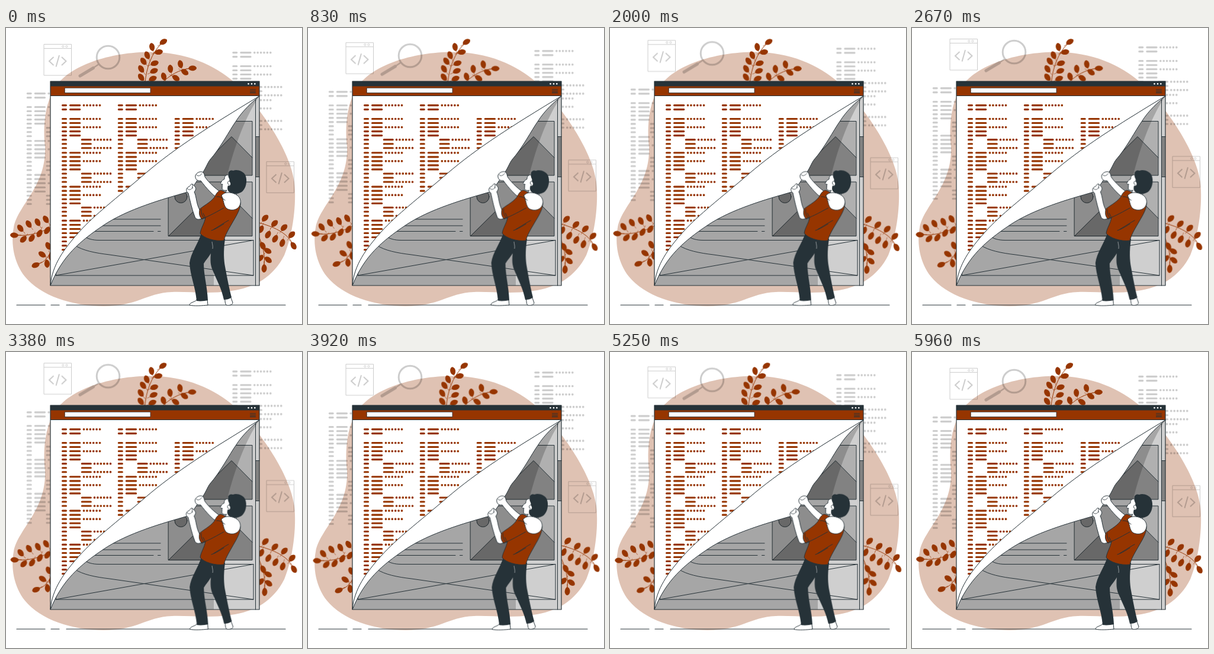
These frames come from a looping animation (500 by 500 pixels, 6000 ms). An HTML page:

```html
<!DOCTYPE html>
<html lang="en">
<head>
<meta charset="utf-8">
<title>Page peel</title>
<style>
  html, body { margin: 0; width: 100%; height: 100%; overflow: hidden; background: #fff; }
  svg { display: block; width: 100%; height: 100%; }
  .ink { fill: none; stroke: #263238; stroke-linecap: round; stroke-linejoin: round; }
  .skin { fill: #fff; stroke: #263238; stroke-linejoin: round; stroke-linecap: round; }
  .cloth { fill: #963500; stroke: #263238; stroke-linejoin: round; }
  .dark { fill: #263238; }
  .bars, .dots { fill: none; stroke-linecap: round; stroke-width: 3.1; }
  .dots { stroke-width: 3.7; }
  .float { animation: float 6s linear infinite; }
  .sway { transform-box: view-box; animation: sway 6s linear infinite; }
  #plants { transform-origin: 249px 215px; }
  #person { transform-origin: 358px 354px; }
  @keyframes float { 50% { transform: translateY(-10px); } }
  @keyframes sway {
    0%, 100% { transform: rotate(0deg); }
    25% { transform: rotate(1deg); }
    75% { transform: rotate(-1deg); }
  }
</style>
</head>
<body>
<svg viewBox="0 0 500 500" xmlns="http://www.w3.org/2000/svg">
  <defs>
    <path id="leaf" d="M-11 0L-6 0C-5 -4 0 -5.4 4 -4C7 -2.8 8 -.8 8 .5C7 3.6 3 5 0 4.2C-3 3.5 -5 2 -6 .4L-11 .6Z"/>
    <g id="snippet" fill="none" stroke="#000">
      <path d="M0 0H46.5V52.5H0ZM0 7H46.5" stroke-width="1"/>
      <circle cx="32.3" cy="3.6" r="1.6" stroke-width=".9"/>
      <circle cx="38.4" cy="3.6" r="1.6" stroke-width=".9"/>
      <path d="M16.5 21.5L9 28.5L16.5 35.500M30 21.500L37.500 28.500L30 35.500M26 18.500L20.500 38" stroke-width="2"/>
    </g>
    <g id="picture">
      <path d="M274.500 157.500H416V249H274.500Z" fill="#b0b0b0" class="edge"/>
      <circle cx="295.500" cy="182.500" r="10.500" fill="#828282"/>
      <path d="M274.500 249L319 205L341 223L381 183.500L416 219V249Z" fill="#828282"/>
      <circle class="ink" cx="295.500" cy="182.500" r="10.500"/>
      <path class="ink" d="M274.500 249L319 205L341 223L381 183.500L416 219M274.500 157.500H416V249H274.500Z"/>
    </g>
    <clipPath id="sheet">
      <path d="M75 115H428C345 165 285 203 235 246S150 315 124 344S78 400 75 435Z"/>
    </clipPath>
  </defs>

  <path fill="#dfc2b3" d="M66 201C62 165 66 128 82 102C103 67 166 42 240 40.500C303 40 352 62 386 92C430 134 480 207 487 260C491 296 485 348 470 384C452 420 420 439 380 444C340 450 312 445 280 446C236 448 222 470 165 470C112 470 58 452 32 420C13 396 8 364 13 337C20 299 68 268 66 201Z"/>

  <g class="float">
    <g id="faint" opacity=".2" stroke="#000">
      <use href="#snippet" x="64" y="27.500"/>
      <use href="#snippet" x="440" y="225.800"/>
      <g fill="none">
        <circle cx="172.500" cy="49.500" r="19.300" stroke-width="3"/>
        <path d="M157 61L148 67" stroke-width="2.200"/>
        <path d="M147.500 67.500L125 81" stroke-width="5" stroke-linecap="round"/>
      </g>
    </g>
  </g>

  <g id="plants" class="sway" fill="#963500"></g>

  <path class="ink" stroke-width="1.200" d="M18 468H66M76 468H90M102 468H472"/>

  <g stroke-width="1">
    <path fill="#cfcfcf" d="M75 114H428V435H75Z"/>
    <use href="#picture"/>
    <use href="#picture" y="102.500"/>
    <path fill="#828282" d="M421.500 183.500H428V251.500H421.500Z"/>
    <path class="ink" d="M421.500 115V435M421.500 183.500H428M421.500 251.500H428"/>
    <path d="M428 115C390 170 352 290 351 435H75V115Z" opacity=".2"/>
    <path class="ink" d="M140 323H261M140 334H261M130 343.500H249M256.500 343.500H261"/>
    <path class="ink" d="M131 351C137 356 146 358.500 157 358.500H418V418H84C85 405 95 390 105 380M418 358.500L84 418M116 367C130 376 150 380 175 383L418 418"/>
    <path fill="#fff" d="M75 115H428C345 165 285 203 235 246S150 315 124 344S78 400 75 435Z"/>
    <g id="code" clip-path="url(#sheet)" stroke="#963500"></g>
    <path class="skin" d="M428 115C345 165 285 203 235 246S150 315 124 344S78 400 75 435C95 385 125 360 165 333C205 306 265 289 307 277L318 265L330 247C337 239 340 228 345 222C362 203 378 172 388 158C400 139 415 126 428 115Z"/>
    <path fill="#963500" d="M75 98H428V114.500H75Z"/>
    <path class="dark" d="M75 90H428V98.500H75Z"/>
    <path class="ink" stroke-width="1.200" d="M75 90H428V435H75ZM75 114.500H428"/>
    <path class="skin" stroke-width=".8" d="M99.500 101.300H244V109.600H99.500Z"/>
    <path class="ink" stroke-width="1.100" d="M412.500 104H421.500M412.500 106.700H421.500M412.500 109.400H421.500"/>
    <path d="M409.500 94.300h.01M415 94.300h.01M420.300 94.300h.01" stroke="#fff" stroke-width="2.700" stroke-linecap="round"/>
  </g>

  <g id="person" class="sway" stroke-width="1">
    <path class="skin" d="M322 459C321 463 310 463 310 468C316 470 333 469 341 468L340 459ZM369 455C371 460 369 465 372 468C376 469 383 468 383 464L379 453Z"/>
    <path class="dark" d="M344 352L370 356C367 378 368 392 370 403C374 424 377 440 381 455C377 458 372 459 368 459C364 440 357 428 349 409C345 400 345 392 346 380Z"/>
    <path class="dark" d="M330 347C324 365 312 380 310 397C311 418 320 437 322 461C329 462 336 461 341 460C340 437 334 417 334 398C338 391 345 385 349 374L366 357Z"/>
    <path class="skin" d="M363 291C351 285 338 270 329 258C323 259 319 255 320 249C322 244 329 241 333 244C336 247 335 251 337 253C344 263 357 274 368 281Z"/>
    <path class="ink" stroke-width=".8" d="M322 248C324 252 329 249 331 246"/>
    <path class="skin" d="M375 248C370 248 369 252 369 255C366 258 365 256 364 260C361 263 363 264 366 264C364 267 366 267 365 270C365 274 369 275 373 274L368 282L390 287L388 265Z"/>
    <path class="dark" d="M376 248C374 242 380 239 384 241C390 238 401 242 404 248C408 256 406 268 401 274C396 281 383 282 377 277C373 274 374 269 375 266C379 268 381 262 377 259C379 254 374 252 376 248Z"/>
    <path class="skin" d="M378 259C374 257 373 264 377 265"/>
    <path class="cloth" d="M366 275C360 271 355 280 352 286C345 295 332 301 326 307C325 314 327 321 331 323L337 320C335 331 329 338 328 347C334 355 353 361 368 359C371 347 378 337 384 326C390 316 397 304 396 294L380 282Z"/>
    <path class="skin" d="M364 283C369 276 380 277 388 281C394 284 397 290 396 296C394 307 382 310 373 305C367 300 368 290 364 283Z"/>
    <path class="skin" d="M327 307C321 296 322 285 318 277C323 271 320 268 315 264C312 262 312 267 309 268C304 270 303 276 308 279C311 292 314 306 319 319C321 324 326 324 330 322C326 317 326 312 327 307Z"/>
    <path class="ink" stroke-width=".8" d="M306 271C309 275 314 273 315 269M315 264L315 271"/>
    <path class="ink" d="M330 306C329 312 331 317 334 320M331 322C344 318 358 309 368 304M333 313L336 319M356 285C361 284 365 287 370 291M347 342C356 339 361 335 368 331M351 340C361 334 370 328 376 325"/>
    <path fill="none" stroke="#fff" stroke-width=".5" d="M349 373C350 368 348 364 348 361"/>
  </g>
</svg>
<script>
  const NS = 'http://www.w3.org/2000/svg';
  const byId = id => document.getElementById(id);
  function add(parent, tag, attrs) {
    const el = document.createElementNS(NS, tag);
    for (const k in attrs) el.setAttribute(k, attrs[k]);
    parent.append(el);
  }

  // One column of code: a two-line header, then blocks of eight lines.
  function column(parent, x, y, rows, header = true) {
    let bars = '', dots = '';
    const bar = (dx, dy, w) => bars += `M${x + dx} ${y + dy}h${w}`;
    const dotted = (dx, dy) => {
      for (let k = 0; k < 6; k++) dots += `M${x + dx + k * 5.4} ${y + dy}h.01`;
    };
    function line(dy, indent, tail) {
      bar(0, dy, 6);
      bar(indent ? 32.8 : 13, dy, indent ? 15 : 16.3);
      if (tail) dotted(indent ? 54 : 36, dy);
    }
    if (header) {
      line(0, false, true);
      line(7, false, false);
    }
    for (let i = 0; i < rows; i++) {
      const n = i % 8;
      line(22.9 + 57.3 * Math.floor(i / 8) + 7.03 * n, n > 4, [0, 2, 5, 7].includes(n));
    }
    add(parent, 'path', { class: 'bars', d: bars });
    add(parent, 'path', { class: 'dots', d: dots });
  }

  column(byId('code'), 95.5, 130.6, 34);
  column(byId('code'), 190.3, 130.6, 18);
  column(byId('code'), 286.2, 130.6, 10, false);
  column(byId('faint'), 36.2, 110.6, 24);
  column(byId('faint'), 383.8, 41.6, 16);

  // Leaves are [x, y, angle], pointing away from the stem.
  const plants = [
    ['M235 92C237 68 246 42 262 27', [
      [265, 24, -35], [247, 33, -105], [257, 41, -15], [239, 47, -115], [250, 60, -20],
      [233, 57, -130], [229, 70, -125], [249, 73, -25], [229, 84, -130], [247, 86, -25]]],
    ['M264 92C277 80 292 70 312 68', [
      [314, 68, -5], [295, 62, -105], [301, 74, 30], [278, 70, -100], [286, 84, 30], [267, 83, -110]]],
    ['M77 336C60 345 40 352 18 350', [
      [15, 350, 180], [25, 339, -130], [30, 356, 130], [39, 332, -125], [44, 354, 120],
      [54, 329, -120], [57, 346, 115], [68, 324, -125], [70, 341, 120]]],
    ['M78 372C72 388 64 396 54 399', [
      [51, 400, 155], [69, 397, 80], [62, 383, -150], [72, 369, -120], [76, 386, 70]]],
    ['M427 329C450 335 474 345 484 364', [
      [485, 367, 55], [482, 350, -50], [467, 362, 105], [469, 338, -50], [455, 355, 115],
      [453, 331, -50], [443, 348, 115], [437, 322, -50], [431, 339, 115]]],
    ['M427 352C434 368 438 384 436 402', [
      [436, 405, 88], [442, 391, 35], [430, 388, 135], [441, 376, 25], [433, 367, 60]]]
  ];
  for (const [stem, leaves] of plants) {
    add(byId('plants'), 'path', { d: stem, fill: 'none', stroke: '#963500' });
    for (const [x, y, angle] of leaves)
      add(byId('plants'), 'use', { href: '#leaf', transform: `translate(${x} ${y}) rotate(${angle})` });
  }
</script>
</body>
</html>
```
